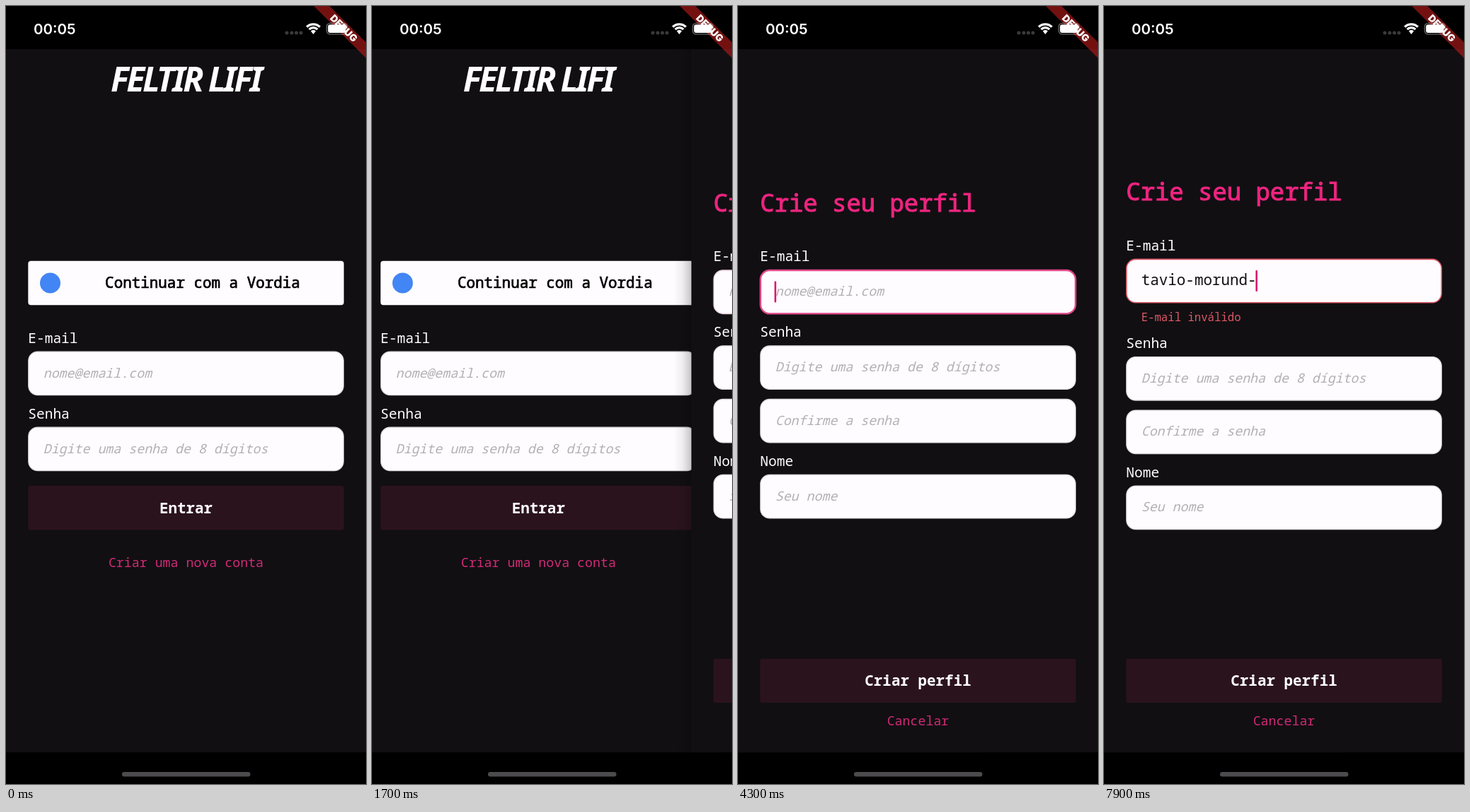
Recreate the animation shown at these times as an HTML page. Size 509 by 1101 pixels, loop 8000 ms.

```html
<!DOCTYPE html>
<html lang="pt">
<head>
<meta charset="utf-8">
<title>Login e cadastro</title>
<style>
  html, body { margin: 0; height: 100%; overflow: hidden; background: #000; }
  #stage { display: block; width: 100vw; height: 100vh; }
  text { font-family: "Noto Sans Mono", "DejaVu Sans Mono", monospace; white-space: pre; }
  .logo { font: italic 800 48px "Noto Sans", "Open Sans", sans-serif; letter-spacing: -3.2px; }
  .clock { font: 600 20.5px Inter, sans-serif; }
  .debug { font: 900 13.8px Inter, sans-serif; }
</style>
</head>
<body>
<svg id="stage" viewBox="0 0 509 1101" preserveAspectRatio="none"></svg>
<script>
const W = 509, TOP = 61, BOTTOM = 1056.5, LOOP = 8000, STEP = 200;
const BG = '#110f12', PINK = '#ee2480', LINK = '#d22a77', PALE = '#fffcff', ERROR = '#de5967';
const TYPED = 'tavio-morund-', CHAR = 12.53, TEXT_X = 52.7, ERROR_SHIFT = 15.6;

// Text is placed by the vertical centre of its capitals.
const label = (text, x, cy, size, fill, extra = '') =>
  `<text x="${x}" y="${cy + size * .345}" font-size="${size}" fill="${fill}" ${extra}>${text}</text>`;
const centred = 'text-anchor="middle"';
// A thin outline gives the regular face a medium weight.
const medium = (colour, width) => `stroke="${colour}" stroke-width="${width}"`;
const caption = (text, cy) => label(text, 31.3, cy, 19.5, '#fff');
const hint = (text, cy) => label(text, TEXT_X, cy - .5, 18.27, '#b3b0b3', 'font-style="italic"');
const box = (y, id = '') =>
  `<rect ${id} x="31.8" y="${y + .5}" width="445.4" height="61.4" rx="13" fill="${PALE}" stroke="#dedbde" stroke-width="1.3"/>`;
const field = (text, y) => box(y) + hint(text, y + 31);
const button = (text, y) =>
  `<rect x="31.3" y="${y}" width="446.4" height="62.4" rx="3" fill="#2b131d"/>` +
  label(text, 254.5, y + 31.5, 20.9, '#fff', centred + ' font-weight="700"');
const link = (id, text, cy, width, height, splashX) => `
  <svg id="${id}" x="${254.5 - width / 2}" y="${cy - height / 2}" width="${width}" height="${height}">
    <rect width="100%" height="100%" fill="#252327"/>
    <circle cx="${splashX}" cy="${height / 2 + 8.5}" r="12" fill="#4a484c"/>
  </svg>` + label(text, 254.5, cy + .5, 18.27, LINK, centred);
const page = `<rect y="${TOP}" width="${W}" height="${BOTTOM - TOP}" fill="${BG}"/>`;

const login = `<g id="login">${page}
  <text class="logo" x="254" y="121" fill="#fff" ${centred}>FELTIR LIFI</text>
  <rect x="31.3" y="360.7" width="446.4" height="62.6" rx="4" fill="${PALE}"/>
  <circle cx="62.5" cy="392" r="14.5" fill="#4285f4"/>
  ${label('Continuar com a Vordia', 278, 392, 20.9, '#000', `${centred} ${medium('#000', .7)}`)}
  ${caption('E-mail', 470)}${field('nome@email.com', 488.7)}
  ${caption('Senha', 577)}${field('Digite uma senha de 8 dígitos', 595.7)}
  ${button('Entrar', 679)}
  ${link('openPress', 'Criar uma nova conta', 787, 219, 34, 81)}
</g>`;

const signup = `<g id="signup">
  <rect x="-25" y="${TOP}" width="25" height="${BOTTOM - TOP}" fill="url(#edge)"/>${page}
  <g id="upper">
    ${label('Crie seu perfil', 31.3, 279, 33.93, PINK, medium(PINK, 1))}
    ${caption('E-mail', 354.5)}${box(373.5, 'id="email"')}
    <g id="emailHint">${hint('nome@email.com', 404.5)}</g>
    ${label('', TEXT_X, 403.5, 20.9, '#111', 'id="typed"')}
    <rect id="caret" y="389.5" width="2.6" height="30" rx="1" fill="#d81b70"/>
    ${label('E-mail inválido', TEXT_X, 456.5, 15.66, ERROR, 'id="error"')}
  </g>
  <g id="lower">
    ${caption('Senha', 461.5)}${field('Digite uma senha de 8 dígitos', 480.5)}
    ${field('Confirme a senha', 556)}
    ${caption('Nome', 644.5)}${field('Seu nome', 663)}
  </g>
  ${button('Criar perfil', 923.7)}
  ${link('cancelPress', 'Cancelar', 1011, 88, 50, 44)}
</g>`;

const arc = r => {
  const d = r * Math.SQRT1_2;
  return `M${434.5 - d} ${39 - d}A${r} ${r} 0 0 1 ${434.5 + d} ${39 - d}`;
};
const chrome = `
  <rect width="${W}" height="${TOP}"/>
  <rect y="${BOTTOM}" width="${W}" height="45"/>
  <rect x="164" y="1084" width="181.5" height="6.4" rx="3.2" fill="#4c4b4d"/>
  <text class="clock" x="39" y="40" fill="#fff">00:05</text>
  <g fill="#3a3a3a">${[397, 404, 410.5, 417].map(x => `<circle cx="${x}" cy="38" r="2.5"/>`).join('')}</g>
  <path d="${arc(13.2)}${arc(8.3)}" fill="none" stroke="#fff" stroke-width="3.2"/>
  <path d="${arc(5)}L434.5 40Z" fill="#fff"/>
  <g transform="translate(${W} 0) rotate(45)">
    <rect x="-80" y="36.5" width="160" height="15.7" fill="#b71c1c" fill-opacity=".627"/>
    <text class="debug" y="49.3" fill="#fff" ${centred}>DEBUG</text>
  </g>
  <rect x="453.3" y="24.3" width="29" height="15.6" rx="5" fill="none" stroke="#fff" stroke-opacity=".4" stroke-width="1.3"/>
  <rect x="455.2" y="26.2" width="25.2" height="11.8" rx="3.2" fill="#fff"/>`;

const stage = document.getElementById('stage');
stage.innerHTML = `<defs><linearGradient id="edge">
  <stop stop-opacity="0"/><stop offset=".5" stop-opacity=".06"/><stop offset="1" stop-opacity=".22"/>
  </linearGradient></defs>` + login + signup + chrome;
const el = id => document.getElementById(id);
const show = (id, opacity) => el(id).setAttribute('opacity', Number(opacity));
const move = (id, x, y) => el(id).setAttribute('transform', `translate(${x} ${y})`);

// Distance left to travel in a page transition that decays towards rest.
const remaining = (t, start) => {
  const d = W * Math.exp((start - t) / 100);
  return d < 1.1 ? 0 : d;
};

function pageOffset(t) {
  if (t < 700) return W;
  if (t < 1700) return remaining(t, 386);
  if (t < 3300) return W - remaining(t, 1482);
  return remaining(t, 3068);
}

const typedCount = t =>
  t < 4900 ? 0 : t < 7700 ? Math.min(11, (t - 4700) / STEP) : (t - 5300) / STEP;

function emailBorder(t, focused, invalid) {
  if (invalid) return [ERROR, 1.6];
  if (focused) return ['#e4488a', 2.4];
  return t === 1700 ? ['#f0cfdd', 1.5] : ['#dedbde', 1.3];
}

function draw(time) {
  const t = Math.floor((time + 100) / STEP) * STEP - 100;
  const offset = pageOffset(t), count = typedCount(t);
  const invalid = count > 0, shift = invalid ? ERROR_SHIFT : 0;
  const focused = t >= 4300 || (t >= 1300 && t < 1700);

  move('login', (offset / W - 1) * W / 3, 0);
  move('signup', offset, 0);
  show('signup', offset < W);
  show('openPress', t === 500 || t === 3100);
  show('cancelPress', t === 1500);

  move('upper', 0, -shift);
  move('lower', 0, shift);
  const [stroke, width] = emailBorder(t, focused, invalid);
  el('email').setAttribute('stroke', stroke);
  el('email').setAttribute('stroke-width', width);
  show('emailHint', !invalid);
  show('error', invalid ? Math.min(1, (t - 4800) / STEP) : 0);
  el('typed').textContent = TYPED.slice(0, count);
  el('caret').setAttribute('x', TEXT_X - 1.2 + count * CHAR);
  show('caret', focused);
}

const begin = performance.now();
(function tick() {
  draw((performance.now() - begin) % LOOP);
  requestAnimationFrame(tick);
})();
</script>
</body>
</html>
```
